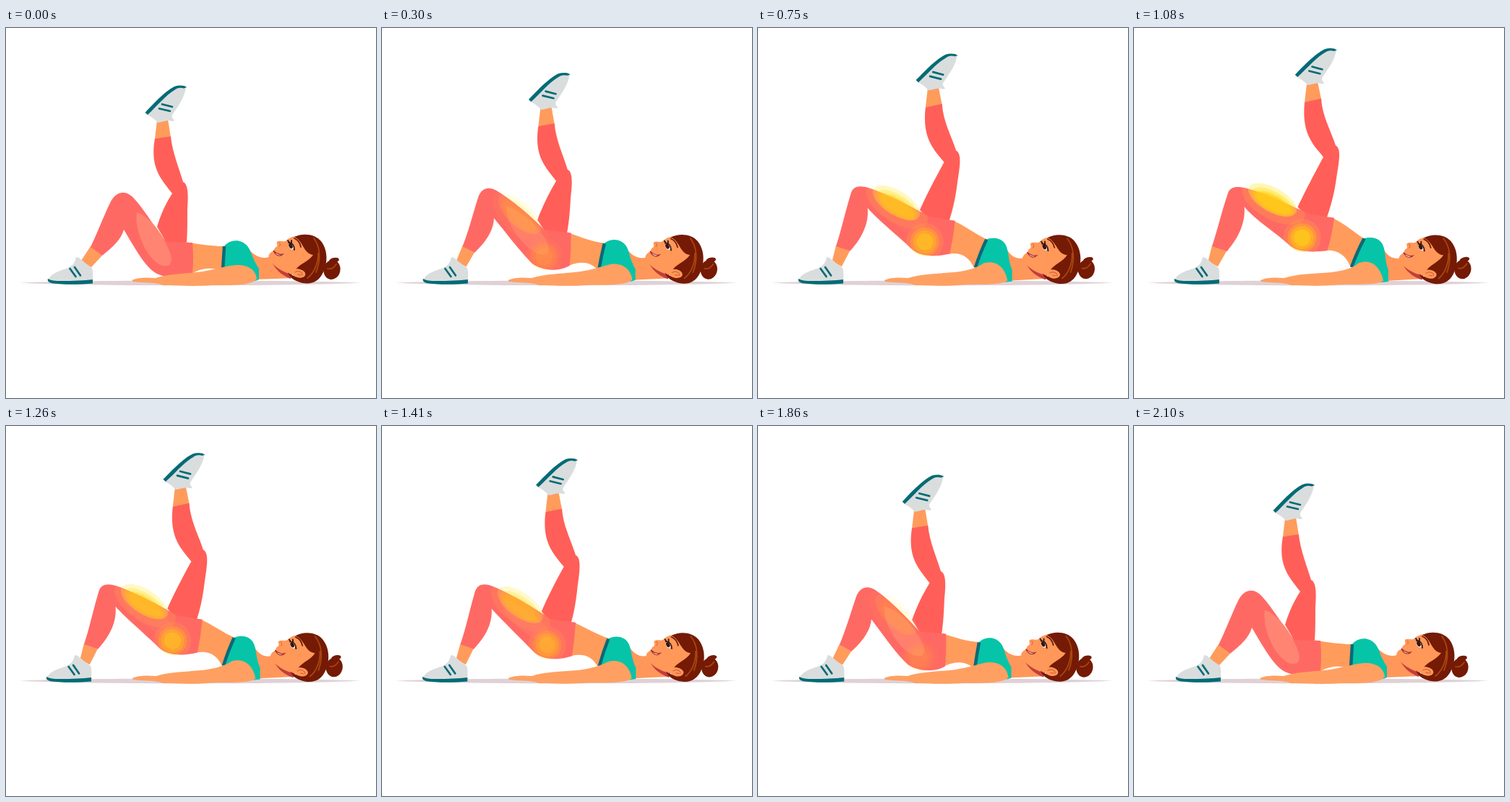
Animation of 512 by 512 pixels, one loop 2250 ms. Source, as an HTML page:

```html
<!DOCTYPE html>
<html lang="en">
<head>
<meta charset="utf-8">
<title>Single-leg glute bridge</title>
<style>
html, body { margin: 0; width: 100%; height: 100%; overflow: hidden; background: #fff; }
svg { display: block; width: 100vw; height: 100vh; }
.line { fill: none; stroke-linecap: round; }
</style>
</head>
<body>
<svg viewBox="0 0 512 512">
  <clipPath id="legClip"><path id="legClipPath"/></clipPath>

  <path fill="#dfd1d6" d="M18 352.500 C110 348.500 400 348.500 491 352.500 C400 357.500 110 357.500 18 352.500Z"/>

  <!-- raised leg -->
  <path id="farAnkle" fill="#ff9c5c"/>
  <path id="farLeg" fill="#ff5f58"/>
  <g id="farShoe">
    <path fill="#dadddd" d="M194 117 C205 105 218 90 235 82 L249 82 C247 97 238 108 231 119 C228 123 231 125 233 128 C230 130 228 128 225 128 C219 128 214 131 210 131 C206 126 201 123 195 120Z"/>
    <path fill="#016b76" d="M192.500 117 C204 105 218 89 233 81 C239 79 246 79 250 82 L246 83.500 C241 82 237 83 233 86 C221 93 209 108 196 120Z"/>
    <path class="line" stroke="#016b76" stroke-width="2.700" d="M216 105.500L230 109M212 111.500L227 115"/>
  </g>

  <path id="torso" fill="#ff9c5c"/>

  <!-- planted leg -->
  <path id="nearAnkle" fill="#ff9c5c"/>
  <g id="nearShoe">
    <path fill="#dadddd" d="M58 349 C62 340 72 337 80 334 C87 332 95 329 97 317 C101 317 103 320 106 322 C110 326 114 328 119 332 C121 338 120 344 120 350 L59 350Z"/>
    <path fill="#016b76" d="M58 347 C62 349.500 68 350 77 350 C92 350 108 349.500 120 348 L120 353.500 C98 355.500 76 355 63 353 C59 352 57 350 58 347Z"/>
    <path class="line" stroke="#016b76" stroke-width="2.700" d="M88.500 333L96.500 344M95 331L103 342.500"/>
  </g>
  <path id="nearLeg" fill="#ff6964"/>
  <path id="sheen" fill="#ff8572"/>

  <g id="glow" fill="#ffd500">
    <g clip-path="url(#legClip)" fill="#ff9a4a">
      <ellipse class="thigh" rx="48" ry="23" opacity=".38"/>
      <circle class="hip" r="26" opacity=".38"/>
    </g>
    <g class="thigh">
      <ellipse cx="-3" cy="-3" rx="37" ry="17" fill="#ffe93c" opacity=".38"/>
      <ellipse cx="-1" cy="-1" rx="33" ry="14" opacity=".34"/>
      <ellipse rx="29" ry="11.500" opacity=".4"/>
      <ellipse rx="26" ry="9" fill="#ffcd19" opacity=".75"/>
    </g>
    <g class="hip">
      <circle r="20" opacity=".3"/>
      <circle r="16" opacity=".4"/>
      <circle r="11.500" fill="#ffcd19" opacity=".75"/>
    </g>
  </g>

  <!-- upper body -->
  <path id="neck" fill="#ff975a"/>
  <path id="bra" fill="#06c4a8"/>
  <path id="band" class="line" stroke="#0b6977" stroke-width="4.500" style="stroke-linecap:butt"/>
  <path id="arm" fill="#ffa062"/>

  <g id="head">
    <path fill="#c33d3c" d="M369 326 C375 337 384 343 394 347 L397 338 L380 328Z"/>
    <path fill="#ff9859" d="M404 288 C396 288 391 291 388 294 C384 297 379 293 375 296 C374 299 377 301 374 303 C370 305 372 308 369 309 C365 311 362 315 364 319 C368 328 382 338 396 341 L412 342 L427 314 L417 296Z"/>
    <path fill="#fff" stroke="#a92a2b" stroke-width="1.200" d="M370 308 C374 312 379 314 383 313 C379 317 373 315 370 308Z"/>
    <path class="line" stroke="#d9653c" stroke-width="1" d="M378 297 C380 298 380 301 378 302"/>
    <ellipse cx="394.500" cy="302" rx="3.200" ry="4.500" fill="#fff" transform="rotate(-30 394.500 302)"/>
    <ellipse cx="394" cy="301.500" rx="2.500" ry="3.800" fill="#37150f" transform="rotate(-25 394 301.500)"/>
    <path class="line" stroke="#37150f" stroke-width="1.800" d="M391 297 C396 297 399 301 399 307M392 297L390 294M395 298L395 294"/>
    <path class="line" stroke="#6b1b08" stroke-width="1.800" d="M399 291 C404 293 407 298 408 303"/>
    <path fill="#741a05" d="M399 289 C411 283 428 285 436 295 C446 308 445 326 439 338 C433 351 423 355 411 353 C402 351 393 347 390 338 C394 342 399 344 408 344 C415 340 409 332 401 334 C407 326 419 323 425 314 C411 312 412 295 399 289Z"/>
    <ellipse cx="451" cy="334.500" rx="11.500" ry="13.500" fill="#741a05" transform="rotate(12 451 334.500)"/>
    <ellipse cx="454" cy="321.500" rx="7" ry="3.500" fill="#741a05" transform="rotate(-12 454 321.500)"/>
    <path class="line" stroke="#a8450f" stroke-width="1.800" d="M426 291 C435 303 436 320 429 338M432 312 C432 329 424 341 417 346M457 327 C453 333 449 334 445 333"/>
    <ellipse cx="405" cy="339.500" rx="9.500" ry="6" fill="#ff9859" transform="rotate(12 405 339.500)"/>
    <path class="line" stroke="#d9653c" stroke-width="1.300" d="M400 338 C405 335 411 338 410 342M404 341L408 342"/>
  </g>
</svg>
<script>
// Each part: poses from lying to fully raised; a third pose sits in the middle.
const MID = 0.57;
const parts = {
  farAnkle: [
    "M206 153 L209 128 L224 126 L228 151Z",
    "M237 101 L240 75 L255 73 L260 97Z"
  ],
  farLeg: [
    "M206 153 L228 150 C230 172 240 195 245 213 C253 216 252 235 251 250 C251 270 251 285 250 297 L222 297 L209 275 C214 258 221 243 230 229 C214 208 199 193 206 153Z",
    "M237 101 L260 96 C261 120 274 142 280 161 C288 165 285 182 281 206 C278 228 273 246 267 262 L240 260 L227 247 C236 228 250 201 263 177 C246 157 233 142 237 101Z"
  ],
  torso: [
    "M248 296 C266 299 285 302 300 302 L299 336 C287 331 271 331 257 340Z",
    "M262 274 C280 282 298 292 313 295 L298 333 C290 320 278 316 261 321Z",
    "M273 261 C290 268 305 282 318 291 L300 331 C295 317 284 306 267 307Z"
  ],
  nearAnkle: [
    "M117 302 L104 322 C108 327 113 330 118 331 L133 315Z",
    "M109 301 L103 321 C107 326 112 328 116 330 L127 308Z",
    "M108 301 L103 321 C107 326 112 328 116 330 L129 308Z"
  ],
  nearLeg: [
    "M117 303 C128 280 137 256 145 240 C153 226 164 225 173 232 C186 243 200 268 222 296 L258 297 Q260 318 258 340 C245 350 220 346 207 339 C190 328 176 300 163 279 C160 292 147 304 133 315Z",
    "M109 302 C117 280 122 255 129 231 C133 218 143 218 153 222 C175 232 205 250 230 270 L266 275 Q265 298 262 321 C247 327 225 329 210 317 C193 299 168 273 152 255 C153 268 149 287 127 309Z",
    "M108 302 C115 282 122 252 130 230 C133 219 143 219 156 222 C185 229 215 245 245 257 L278 262 Q275 285 268 307 C252 309 224 310 214 298 C195 281 167 265 153 247 C154 262 151 283 129 309Z"
  ],
  sheen: [
    "M181 255 C190 256 210 275 218 292 C228 310 232 322 226 328 C212 335 195 312 190 300 C182 282 179 268 181 255Z",
    "M155 232 C170 232 195 240 212 250 C232 262 240 275 232 283 C215 283 190 265 178 258 C165 250 157 240 155 232Z"
  ],
  neck: [
    "M334 303 C342 316 356 321 366 316 L385 330 L398 346 L345 348Z",
    "M344 302 C349 316 360 321 369 318 L388 332 L400 347 L348 350Z"
  ],
  bra: [
    "M302 302 C309 293 325 290 335 303 C340 310 340 318 350 333 L350 348 L345 350 L300 335Z",
    "M318 291 C325 289 340 288 345 301 C349 312 347 322 352 335 L352 351 L342 352 L303 332Z"
  ],
  band: [
    "M302 302 Q301 318 300 335",
    "M319 291 Q309 309 301 331"
  ],
  arm: [
    "M174 349 C182 345 195 345 207 346 C225 340 250 340 272 337 C290 334 300 330 318 328 C335 327 346 335 347 347 C340 357 310 356 285 356 C255 358 235 356 218 356 C205 351 190 353 176 351Z",
    "M175 349 C183 345 196 345 208 346 C226 340 250 340 274 338 C290 336 302 333 311 325 C328 319 341 330 345 350 C336 356 310 354 285 355 C255 358 235 356 218 356 C205 351 190 353 176 351Z"
  ]
};

const NUM = /\d+(\.\d+)?/g;
const el = id => document.getElementById(id);
const mix = (a, b, p) => a + (b - a) * p;
const shapes = Object.entries(parts).map(([id, poses]) => ({
  id, base: poses[0], values: poses.map(d => d.match(NUM).map(Number))
}));

function weights(count, p) {
  if (count === 2) return [1 - p, p];
  return [
    (p - MID) * (p - 1) / MID,
    p * (p - 1) / (MID * (MID - 1)),
    p * (p - MID) / (1 - MID)
  ];
}

function morph({ base, values }, p) {
  const w = weights(values.length, p);
  let i = 0;
  return base.replace(NUM, () => {
    const v = values.reduce((sum, pose, k) => sum + pose[i] * w[k], 0);
    i++;
    return v.toFixed(2);
  });
}

function place(selector, transform) {
  document.querySelectorAll(selector).forEach(n => n.setAttribute("transform", transform));
}

function draw(p) {
  for (const shape of shapes) {
    const d = morph(shape, p);
    el(shape.id).setAttribute("d", d);
    if (shape.id === "nearLeg") el("legClipPath").setAttribute("d", d);
  }
  place("#farShoe", `translate(${31 * p} ${-53.5 * p}) rotate(${p} 216 130)`);
  place("#nearShoe", `translate(${-2 * p * (2 - p)} 0)`);
  place("#head", `translate(${3.5 * p} ${1.2 * p}) rotate(${-2.5 * p} 405 320)`);
  place(".thigh", `translate(${mix(190, 193, p)} ${mix(272, 241, p)}) rotate(${mix(50, 28, p)})`);
  place(".hip", `translate(${mix(220, 233, p)} ${mix(330, 289, p)})`);
  el("glow").setAttribute("opacity", p);
  el("sheen").setAttribute("opacity", 1 - p);
}

// Rise for 900 ms, hold, sink until 2100 ms, rest; in 30 ms steps.
function lift(ms) {
  const step = Math.floor((ms % 2250) / 30);
  if (step <= 30) return step / 30;
  return Math.max(0, Math.min(1, (70 - step) / 35));
}

function tick() {
  draw(lift(performance.now()));
  requestAnimationFrame(tick);
}
tick();
</script>
</body>
</html>
```
